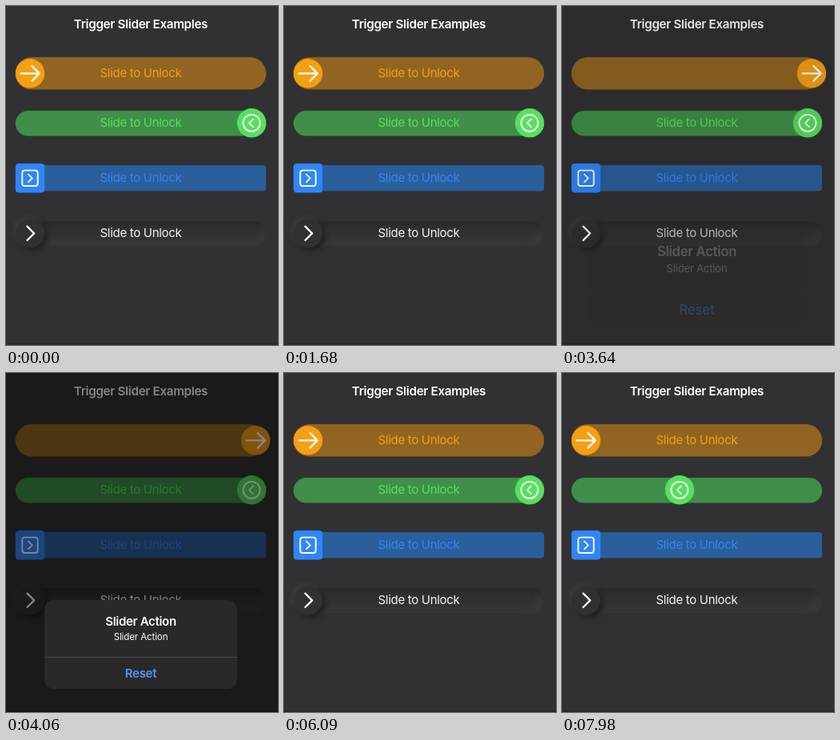
These frames come from a looping animation (340 by 424 pixels, 8000 ms). An HTML page:

```html
<!DOCTYPE html>
<html lang="en">
<head>
<meta charset="utf-8">
<title>Trigger Slider Examples</title>
<style>
  html, body { margin: 0; width: 100%; height: 100%; overflow: hidden; background: #313133; }
  #stage {
    position: relative; width: 340px; height: 424px; overflow: hidden; background: #313133;
    font: 15px/20px Inter, "Liberation Sans", sans-serif; letter-spacing: -.3px; color: #fff;
    text-align: center;
  }
  #stage div, svg { position: absolute; box-sizing: border-box; }
  .title { left: 0; width: 337px; top: 13px; font-size: 15.2px; font-weight: 600; }
  .floor { left: 0; right: 0; bottom: 0; height: 2px; background: #2d2628; }
  #rows { left: 0; top: 0; transform: translateY(.35px); }
  .track { left: 12px; width: 313px; }
  .label { left: 12px; width: 313px; }
  .thumb { left: 12px; width: 36px; height: 36px; border-radius: 50%; }
  svg { left: 0; top: 0; fill: none; stroke: #fff; stroke-linecap: round; stroke-linejoin: round; }
  #dim { inset: 0; background: #000; }
  #alert { left: 48px; top: 284px; width: 241px; height: 111px; border-radius: 12px; background: #29292a; }
  #alert div { left: 0; width: 100%; }
  .head { top: 17px; font-weight: 600; }
  .note { top: 36px; font-size: 11.5px; letter-spacing: -.1px; }
  .rule { top: 71px; height: 1px; background: #444447; }
  .reset { top: 82px; font-weight: 600; color: #4f97f6; }
</style>
</head>
<body>
<div id="stage">
  <div class="title">Trigger Slider Examples</div>
  <div class="floor"></div>
  <div id="rows"></div>
  <div id="dim"></div>
  <div id="alert">
    <div class="head">Slider Action</div>
    <div class="note">Slider Action</div>
    <div class="rule"></div>
    <div class="reset">Reset</div>
  </div>
</div>
<script>
const LOOP = 8000, STEP = 70;
const $ = id => document.getElementById(id);

const sliders = [
  { y: 84, h: 40, r: 20, track: '#916521', color: '#f59f12',
    icon: '<path stroke-width="2.4" d="M6.5 18h23.3M20.5 8.7l9.3 9.3-9.3 9.3"/>' },
  { y: 146, h: 31, r: 16, track: '#3f8f48', color: '#57e05e',
    icon: '<circle cx="18" cy="18" r="10.5" stroke-width="1.9"/><path stroke-width="1.9" d="M19.8 13.2L15 18l4.8 4.8"/>' },
  { y: 215, h: 32, r: 4, track: '#2b5f9b', color: '#2f86fb', square: true,
    icon: '<rect x="8.3" y="8.3" width="19.4" height="19.4" rx="3" stroke-width="1.9"/><path stroke-width="1.9" d="M16 13.2l4.8 4.8-4.8 4.8"/>' },
  { y: 284, h: 31, r: 16, track: '#333335', color: '#313133', text: '#f4f4f4',
    inset: 'inset 5px 6px 8px #29292a, inset -7px -6px 7px #38393c',
    shadow: '-3px -3px 6px #3b3b3e, 4px 4px 6px #212122',
    icon: '<path stroke-width="2.3" d="M14.5 9.3l8.7 8.7-8.7 8.7"/>' }
];

function add(cls, css, html = '') {
  const el = document.createElement('div');
  el.className = cls;
  el.style.cssText = css;
  el.innerHTML = html;
  $('rows').append(el);
  return el;
}

for (const s of sliders) {
  add('track', `top:${s.y - s.h / 2}px;height:${s.h}px;border-radius:${s.r}px;background:${s.track};box-shadow:${s.inset || '0 0 1px ' + s.track}`);
  s.label = add('label', `top:${s.y - 10}px;color:${s.text || s.color}`, 'Slide to Unlock');
  s.thumb = add('thumb', `top:${s.y - 18}px;background:${s.color};box-shadow:${s.shadow || '0 0 1px ' + s.color};${s.square ? 'border-radius:4px' : ''}`,
    `<svg width="36" height="36">${s.icon}</svg>`);
}

const ramp = (t, a, b) => Math.min(1, Math.max(0, (t - a) / (b - a)));
const smooth = u => u * u * (3 - 2 * u);
const easeOut = (u, n) => 1 - (1 - u) ** n;

function place(s, x, progress) {
  s.thumb.style.transform = `translateX(${x}px)`;
  s.label.style.opacity = Math.max(0, 1 - 2 * progress);
}

function draw(t) {
  const drag = smooth(ramp(t, 2670, 3370) ** 1.2) - smooth(ramp(t, 5540, 6020));
  place(sliders[0], 282 * drag, drag);

  const pull = 160 * easeOut(ramp(t, 6900, 7980), 2.55);
  place(sliders[1], 277 - pull, pull / 277);

  const enter = easeOut(ramp(t, 3600, 4060), 2.5);
  const shown = t < 5210 ? enter : (1 - ramp(t, 5210, 5530)) ** 2;
  $('dim').style.opacity = .48 * shown;
  $('alert').style.opacity = shown;
  $('alert').style.transform = `scale(${1.15 - .15 * enter})`;
}

function tick(now) {
  const t = now % LOOP;
  draw(t - t % STEP);
  requestAnimationFrame(tick);
}
draw(0);
requestAnimationFrame(tick);
</script>
</body>
</html>
```
